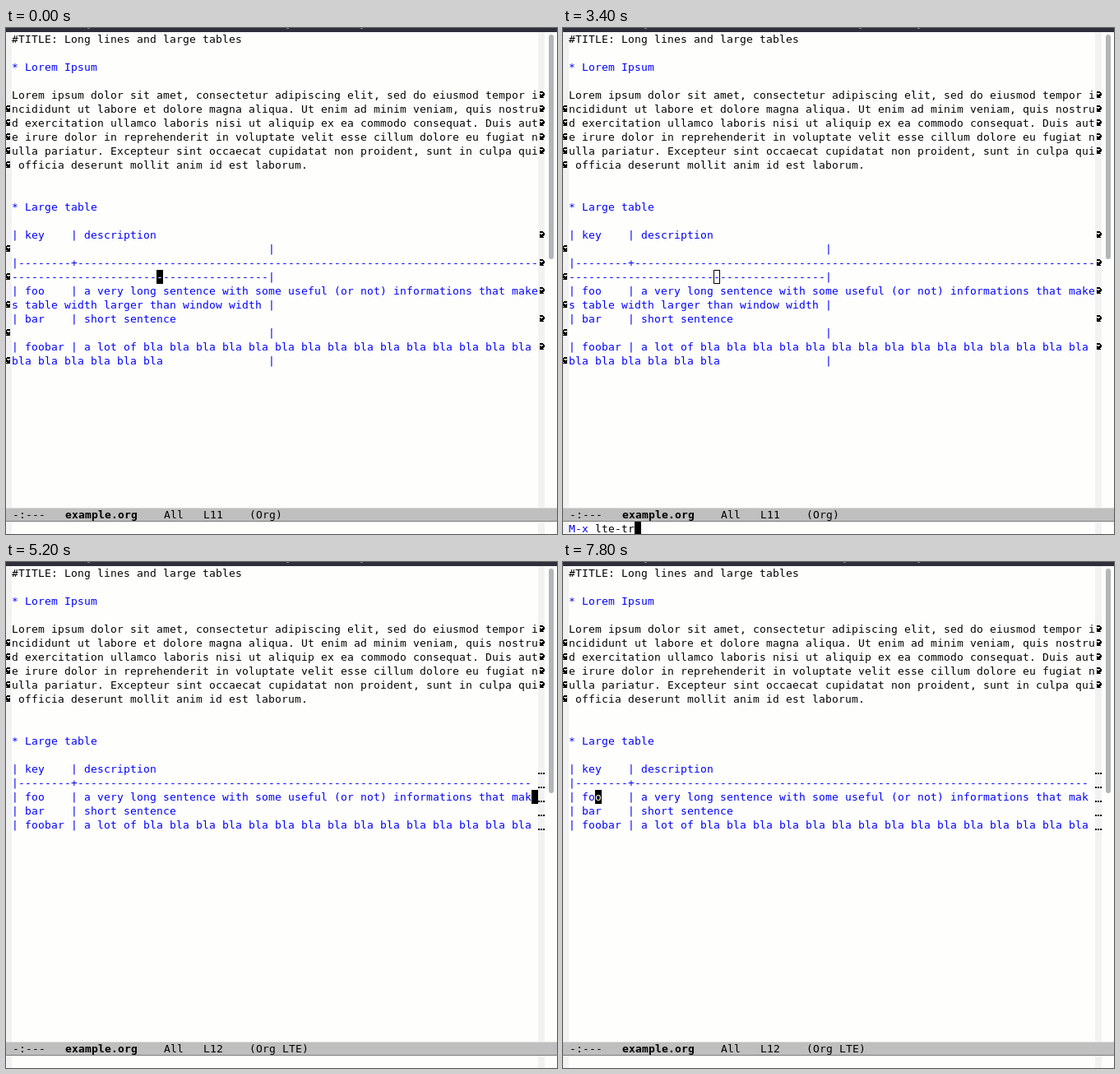
Write an HTML page that moves like this. It is 670x615 px and loops after 8000 ms.

```html
<!DOCTYPE html>
<html lang="en">
<head>
<meta charset="utf-8">
<title>Long lines and large tables</title>
<style>
  html, body { margin: 0; width: 100%; height: 100%; overflow: hidden; background: #fefefc; }
  svg { display: block; }
  text { font: 13px "DejaVu Sans Mono", monospace; white-space: pre; }
  .bold { font-weight: bold; }
</style>
</head>
<body>
<svg id="stage" width="670" height="615" viewBox="0 0 670 615"></svg>
<script>
const LOOP = 8000, CW = 8, RH = 17, LEFT = 7, TOP = 5, ASCENT = 13, COLS = 80;
const ECHO_Y = 600, MODE_Y = 583;
const PAPER = '#fefefc', INK = '#000', BLUE = '#00f', FRINGE = '#f2f2f2';
const stage = document.getElementById('stage');

function add(parent, tag, attrs, content) {
  const el = document.createElementNS('http://www.w3.org/2000/svg', tag);
  for (const k in attrs) el.setAttribute(k, attrs[k]);
  if (content !== undefined) el.textContent = content;
  parent.appendChild(el);
  return el;
}
const group = () => add(stage, 'g', {});
const rect = (p, x, y, width, height, fill) => add(p, 'rect', { x, y, width, height, fill });
const rowY = row => TOP + row * RH;

// Every glyph sits on the terminal-like cell grid.
function write(p, str, x, top, fill, cls = '') {
  if (!str.trim()) return;
  const xs = Array.from(str, (c, i) => x + i * CW).join(' ');
  add(p, 'text', { x: xs, y: top + ASCENT, fill, class: cls }, str);
}
const line = (p, str, row, fill) => write(p, str, LEFT, rowY(row), fill);

// One byte per bitmap row, most significant bit on the left.
function bitmap(p, bytes, x, y) {
  let d = '';
  bytes.forEach((b, r) => {
    for (let i = 0; i < 8; i++) if (b & (128 >> i)) d += `M${x + i} ${y + r}h1v1h-1z`;
  });
  add(p, 'path', { d, fill: INK, 'shape-rendering': 'crispEdges' });
}
const CURL_LEFT = [0x3c, 0x7c, 0xc0, 0xe4, 0xfc, 0x7c, 0x3c, 0x7c];
const CURL_RIGHT = [0x3c, 0x3e, 0x03, 0x27, 0x3f, 0x3e, 0x3c, 0x3e];
const DOTS = [0xdb, 0xdb];

// Writes a long line over several rows and returns the next free row.
function wrap(p, str, row, fill) {
  for (let i = 0; i < str.length; i += COLS, row++) {
    line(p, str.slice(i, i + COLS), row, fill);
    if (i > 0) bitmap(p, CURL_LEFT, -1, rowY(row) + 4);
    if (i + COLS < str.length) bitmap(p, CURL_RIGHT, 647, rowY(row) + 4);
  }
  return row;
}

const LOREM = 'Lorem ipsum dolor sit amet, consectetur adipiscing elit, sed do eiusmod tempor ' +
  'incididunt ut labore et dolore magna aliqua. Ut enim ad minim veniam, quis nostrud ' +
  'exercitation ullamco laboris nisi ut aliquip ex ea commodo consequat. Duis aute irure ' +
  'dolor in reprehenderit in voluptate velit esse cillum dolore eu fugiat nulla pariatur. ' +
  'Excepteur sint occaecat cupidatat non proident, sunt in culpa qui officia deserunt ' +
  'mollit anim id est laborum.';
const entry = (key, text) => `| ${key.padEnd(6)} | ${text.padEnd(107)} |`;
const TABLE = [
  entry('key', 'description'),
  '|' + '-'.repeat(8) + '+' + '-'.repeat(109) + '|',
  entry('foo', 'a very long sentence with some useful (or not) informations that makes ' +
    'table width larger than window width'),
  entry('bar', 'short sentence'),
  entry('foobar', 'a lot of' + ' bla'.repeat(21))
];

// Fixed parts
rect(stage, 0, 0, 670, 615, PAPER);
rect(stage, 0, TOP, LEFT, 610, FRINGE);
rect(stage, 647, TOP, 8, 610, FRINGE);
rect(stage, 0, 0, 670, TOP, '#2f2e3b');
add(stage, 'rect', { x: 660, y: 8, width: 6, height: 273, rx: 3, fill: '#b2b6b9' });
rect(stage, 0, MODE_Y, 670, RH, '#bfbfbf');
rect(stage, 0, MODE_Y, 670, 1, '#dcdcdc');
rect(stage, 0, MODE_Y + RH - 1, 670, 1, '#7a7a7a');
write(stage, '-:---', 8, MODE_Y, INK);
write(stage, 'example.org', 72, MODE_Y, INK, 'bold');
write(stage, 'All', 192, MODE_Y, INK);
line(stage, '#TITLE: Long lines and large tables', 0, INK);
line(stage, '* Lorem Ipsum', 2, BLUE);
wrap(stage, LOREM, 4, INK);
line(stage, '* Large table', 12, BLUE);

// Two looks of the table
const wrapped = group(), cut = group();
TABLE.reduce((row, str) => wrap(wrapped, str, row, BLUE), 14);
TABLE.forEach((str, i) => {
  line(cut, str.slice(0, COLS - 1), 14 + i, BLUE);
  bitmap(cut, DOTS, 647, rowY(14 + i) + 13);
});
const live = group();

const COMMAND = 'lte-truncate-table-mode';
const MESSAGE = 'Lte-Truncate-Table mode enabled in current buffer';

// Steps: buffer cursor [col, row], visible or not, typed length (-1: no prompt)
const edit = (t, col, row, on = true) => ({ t, col, row, on, typed: -1 });
const type = (t, typed, on = true) => ({ t, col: 22, row: 17, on, typed });
const STEPS = [
  edit(0, 22, 17), edit(300, 22, 17, false), edit(800, 22, 17),
  type(900, 0), type(1400, 0, false), type(1900, 0), type(2000, 1),
  type(2300, 2), type(2400, 3), type(2700, 4), type(3200, 4, false),
  type(3300, 5), type(3400, 6), type(3600, 7),
  type(3700, COMMAND.length), type(4300, COMMAND.length, false),
  edit(4400, 79, 15), edit(4900, 79, 15, false),
  edit(5200, 79, 16), edit(5700, 79, 16, false), edit(6200, 79, 16), edit(6700, 79, 16, false),
  edit(6800, 0, 16), edit(7300, 1, 16), edit(7800, 4, 16)
];

function drawCursor(s, isCut) {
  const x = LEFT + s.col * CW, y = rowY(s.row);
  if (s.typed >= 0) {
    add(live, 'rect', { x: x + .5, y: y + .5, width: CW - 1, height: RH - 1, fill: 'none', stroke: INK });
  } else if (s.on) {
    rect(live, x, y, CW, RH, INK);
    const under = isCut ? (s.col < COLS - 1 ? TABLE[s.row - 14][s.col] : ' ') : '-';
    write(live, under, x, y, PAPER);
  }
}

function drawEcho(s) {
  if (s.typed >= 0) {
    write(live, 'M-x', LEFT, ECHO_Y, BLUE);
    const x = LEFT + 4 * CW;
    write(live, COMMAND.slice(0, s.typed), x, ECHO_Y, INK);
    if (s.on) rect(live, x + s.typed * CW, ECHO_Y, CW, 15, INK);
  } else if (s.t >= 4400 && s.t < 5200) {
    write(live, MESSAGE, LEFT, ECHO_Y, INK);
  }
}

let shown = null;
function render(t) {
  const s = STEPS.findLast(step => step.t <= t);
  if (s === shown) return;
  shown = s;
  const isCut = s.t >= 4400;
  wrapped.style.display = isCut ? 'none' : '';
  cut.style.display = isCut ? '' : 'none';
  live.replaceChildren();
  // Lower edge of the window title
  for (const x of s.typed >= 0 ? [99, 360, 431] : [99, 341, 431]) rect(live, x, 0, 3, 1, '#85848f');
  write(live, s.row === 16 ? 'L12' : 'L11', 240, MODE_Y, INK);
  write(live, isCut ? '(Org LTE)' : '(Org)', 296, MODE_Y, INK);
  drawCursor(s, isCut);
  drawEcho(s);
}

function tick() {
  render(performance.now() % LOOP);
  requestAnimationFrame(tick);
}
tick();
</script>
</body>
</html>
```
